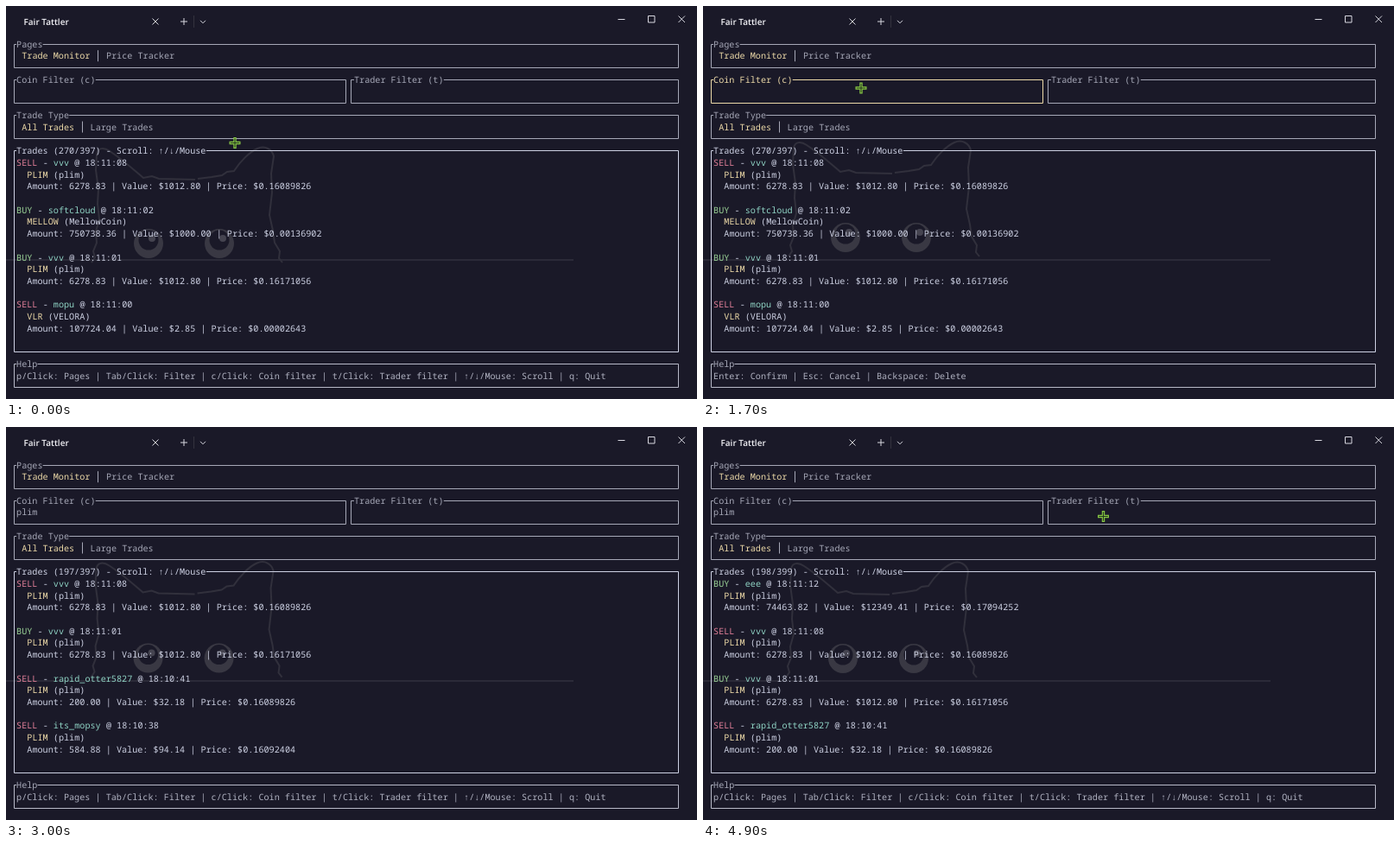
An HTML page that plays this animation: 800 px wide and 455 px high, repeating every 5000 ms.

```html
<!DOCTYPE html>
<html lang="en">
<head>
<meta charset="utf-8">
<title>Trade monitor</title>
<style>
html, body { margin: 0; width: 100%; height: 100%; overflow: hidden; background: #1a1928; }
svg { display: block; width: 800px; height: 455px; }
text { white-space: pre; text-rendering: geometricPrecision; }
#term { font: 10.178px "Noto Sans Mono", "DejaVu Sans Mono", monospace; }
#tab { font: 600 10px "Open Sans", "Noto Sans", sans-serif; fill: #f4f4f8; }
.line { fill: none; stroke-width: 1; }
</style>
</head>
<body>
<svg viewBox="0 0 800 455">
  <rect width="800" height="455" fill="#1a1928"/>
  <text id="tab" x="20.5" y="22.3">Fair Tattler</text>
  <g class="line" stroke="#d8d8e0">
    <path d="M169.5 14.5l7 7m0-7l-7 7M202 18h8m-4-4v8M225 16.8l3 3 3-3"/>
    <path d="M708.5 15.5h8M743.5 11.5h7.5v7.5h-7.5zM778.5 11.5l7.5 7.5m0-7.5l-7.5 7.5"/>
    <path d="M217.5 11v14" stroke="#34333f"/>
  </g>
  <path class="line" d="M0 294H657" stroke="#3d3c48"/>
  <g id="cat" fill="none" stroke="#31303c" stroke-width="2">
    <path d="M99 290l4-6-2-7 4-10-1-13 4-14-2-18 1-17-3-22 1-18c1-9 9-8 15-4 14 9 25 19 39 31l10-2 8 3 42 1M222 193l16-2 12-2 6-4 8-1c7-11 18-22 27-26 9-4 17 1 19 9l-3 20 1 22-3 26 4 18 2 14 6 10-1 8 4 5"/>
    <g id="eyes" stroke="none"></g>
  </g>
  <g id="term"></g>
  <g id="cursor" fill="none">
    <path d="M-6.5 0h13M0-6.5v13" stroke="#86c544" stroke-width="3.4"/>
    <path d="M-5.3 0H5.3M0-5.3V5.3" stroke="#24361f" stroke-width="1.1"/>
  </g>
</svg>
<script>
const $ = id => document.getElementById(id);
const CELL = 6.107, ROW = 13.72;
const DIM = '#a6a8b7', TEXT = '#cdd1e3', YELLOW = '#ecd9a8', RED = '#e07f98', GREEN = '#9bd397', TEAL = '#8fd3c4';
const colX = c => 6 + c * CELL;
const rowY = r => 44 + r * ROW;

const text = (c, r, str, fill = TEXT, weight = 400) =>
  `<text x="${colX(c)}" y="${rowY(r) + 3.6}" fill="${fill}" font-weight="${weight}">${str}</text>`;

// Panel border runs through cell centres and leaves room for its title.
function panel(c0, r0, c1, r1, title, color = DIM, titleColor = color) {
  const mid = c => Math.floor(colX(c + .5)) + .5, snap = r => Math.floor(rowY(r)) + .5;
  const x = mid(c0), y = snap(r0);
  return `<path class="line" stroke="${color}" d="M${colX(c0 + 1)} ${y}H${x}V${snap(r1)}H${mid(c1)}V${y}H${colX(c0 + 1 + title.length)}"/>`
    + text(c0 + 1, r0, title, titleColor);
}

function tabs(r, active, other) {
  const c = active.length + 3, x = Math.floor(colX(c + .5)) + .5;
  return text(2, r, active, YELLOW, 500) + text(c + 2, r, other, DIM)
    + `<path class="line" stroke="${DIM}" d="M${x} ${rowY(r) - 6.5}v13"/>`;
}

const trade = (side, user, time, coin, name, amount, value, price) =>
  ({ side, user, time, coin, name, amount, value, price });
const plim = (side, user, time, ...nums) => trade(side, user, time, 'PLIM', 'plim', ...nums);

const sold = plim('SELL', 'vvv', '18:11:08', '6278.83', '1012.80', '0.16089826');
const bought = plim('BUY', 'vvv', '18:11:01', '6278.83', '1012.80', '0.16171056');
const small = plim('SELL', 'rapid_otter5827', '18:10:41', '200.00', '32.18', '0.16089826');
const lists = [
  ['270/397', sold,
    trade('BUY', 'softcloud', '18:11:02', 'MELLOW', 'MellowCoin', '750738.36', '1000.00', '0.00136902'),
    bought,
    trade('SELL', 'mopu', '18:11:00', 'VLR', 'VELORA', '107724.04', '2.85', '0.00002643')],
  ['197/397', sold, bought, small,
    plim('SELL', 'its_mopsy', '18:10:38', '584.88', '94.14', '0.16092404')],
  ['198/399', plim('BUY', 'eee', '18:11:12', '74463.82', '12349.41', '0.17094252'), sold, bought, small]
];

function tradeRows(t, i) {
  const r = 10 + i * 4, userCol = 1 + t.side.length + 3;
  return text(1, r, t.side, t.side === 'BUY' ? GREEN : RED)
    + text(userCol - 2, r, '-') + text(userCol, r, t.user, TEAL)
    + text(userCol + t.user.length + 1, r, '@ ' + t.time)
    + text(3, r + 1, t.coin, YELLOW, 500) + text(4 + t.coin.length, r + 1, `(${t.name})`)
    + text(3, r + 2, `Amount: ${t.amount} | Value: $${t.value} | Price: $${t.price}`);
}

function screen(list, typed, editing) {
  const [count, ...trades] = lists[list];
  const help = editing ? 'Enter: Confirm | Esc: Cancel | Backspace: Delete'
    : 'p/Click: Pages | Tab/Click: Filter | c/Click: Coin filter | t/Click: Trader filter | ↑/↓/Mouse: Scroll | q: Quit';
  const inputColor = editing ? YELLOW : DIM;
  return panel(0, 0, 126, 2, 'Pages') + tabs(1, 'Trade Monitor', 'Price Tracker')
    + panel(0, 3, 63, 5, 'Coin Filter (c)', inputColor) + text(1, 4, 'plim'.slice(0, typed), inputColor)
    + panel(64, 3, 126, 5, 'Trader Filter (t)')
    + panel(0, 6, 126, 8, 'Trade Type') + tabs(7, 'All Trades', 'Large Trades')
    + panel(0, 9, 126, 26, `Trades (${count}) - Scroll: ↑/↓/Mouse`, TEXT)
    + trades.map(tradeRows).join('')
    + panel(0, 27, 126, 29, 'Help', '#b8bac8', DIM) + text(1, 28, help, '#b0b2c1');
}

$('eyes').innerHTML = [165, 247].map(x =>
  `<circle cx="${x}" cy="268" r="17" fill="#393843"/><circle cx="${x}" cy="264" r="11.5" fill="#1a1928"/>
   <circle cx="${x + 4}" cy="262" r="4" fill="#454450"/>`).join('');

const clamp = v => Math.max(0, Math.min(1, v));
const ease = v => v * v * (3 - 2 * v);
const path = [[0, 265, 158.5], [700, 183, 95], [3700, 183, 95], [4100, 208.5, 145.5], [4800, 463.5, 103.5]];

function cursorAt(t) {
  let [, x, y] = path[0];
  for (let i = 1; i < path.length; i++) {
    const [t0, x0, y0] = path[i - 1], [t1, x1, y1] = path[i];
    if (t < t0) break;
    const k = ease(clamp((t - t0) / (t1 - t0)));
    x = x0 + (x1 - x0) * k;
    y = y0 + (y1 - y0) * k;
  }
  return `translate(${x} ${y})`;
}

let shown = '';
function draw(now) {
  const t = Math.floor(now % 5000 / 100) * 100;
  const list = t < 2600 ? 0 : t < 3200 ? 1 : 2;
  const typed = Math.round(clamp((t - 1900) / 400) * 4);
  const editing = t >= 1000 && t < 2600;
  const key = [list, typed, editing].join();
  if (key !== shown) $('term').innerHTML = screen(list, typed, editing);
  shown = key;

  $('cursor').setAttribute('transform', cursorAt(t));
  $('cursor').setAttribute('visibility', t >= 2000 && t < 3700 ? 'hidden' : 'visible');
  const drift = -3 * clamp((t - 2700) / 2000);
  const lift = 7 * (1 - ease(clamp(t / 600))) - Math.sin(Math.PI * clamp((t - 2800) / 1300));
  $('cat').setAttribute('transform', `translate(${drift} ${lift})`);
  requestAnimationFrame(draw);
}
const start = performance.now();
draw(0);
function draw0() {}
</script>
</body>
</html>
```
